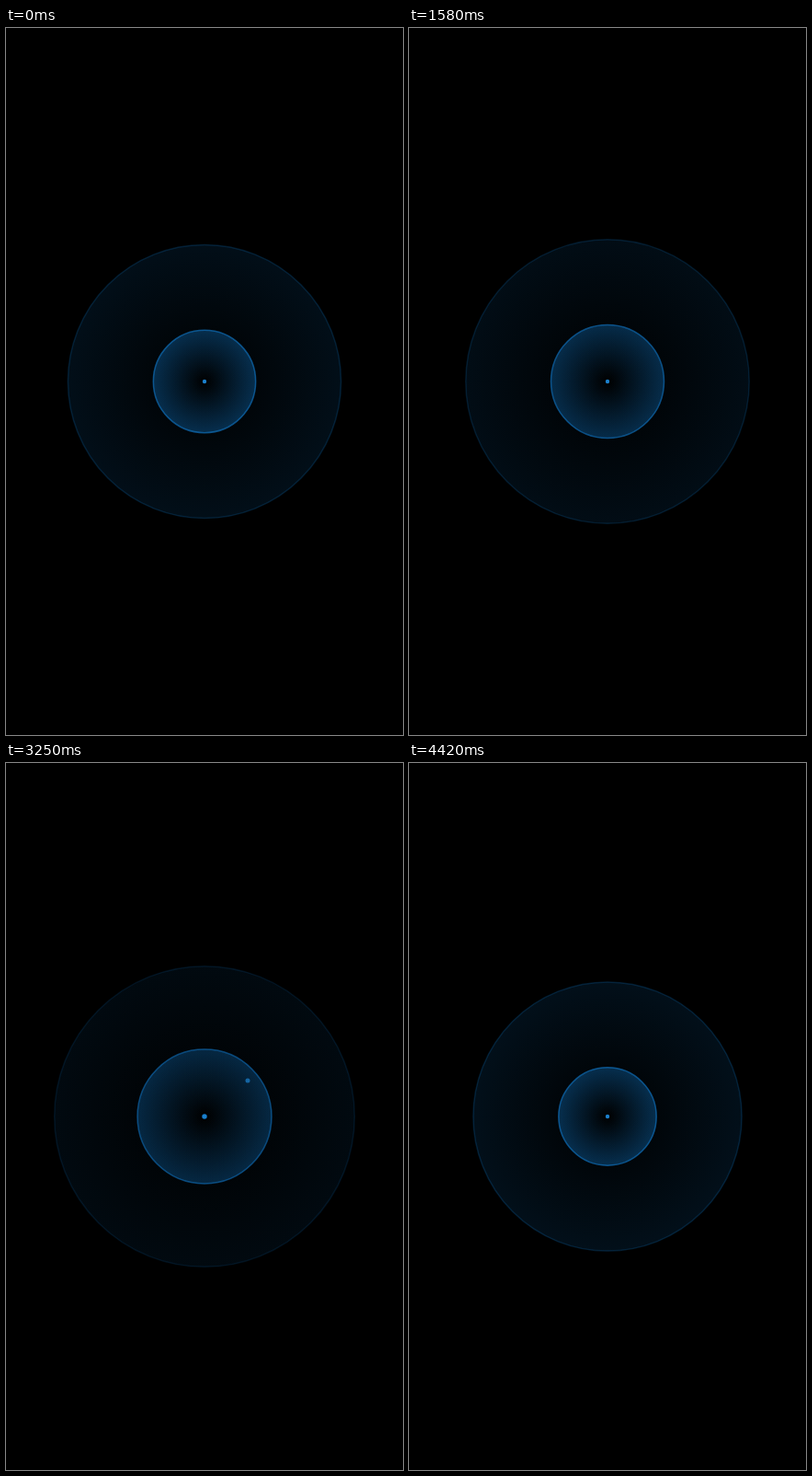
An HTML page with a canvas for the animation above (4460 ms loop, 432 by 768 pixels).

```html
<!DOCTYPE html>
<html lang="en">
<head>
<meta charset="utf-8">
<title>Radar pulse</title>
<style>
  html, body { margin: 0; height: 100%; overflow: hidden; background: #000; }
  canvas { display: block; }
</style>
</head>
<body>
<canvas id="stage" width="432" height="768"></canvas>
<script>
const ctx = document.getElementById('stage').getContext('2d');
const LOOP = 4460, PERIOD = LOOP / 3;
const CX = 216, CY = 384, TAU = Math.PI * 2;

// A ring speeds up, cruises, then brakes to a stop (ms, px per ms)
const CRUISE = 1194, BRAKE = 3000, STOP = 3765, SPEED = 0.0625;

// Blips: [x, y, start in ms]
const BLIPS = [
  [255, 431, 130], [146.5, 424, 1900], [157, 461.5, 2150], [229, 404.5, 2300],
  [248.5, 280, 2380], [263, 345, 3120], [257, 464, 3600]
];
const BLIP_LIFE = 650;

const clamp = v => Math.max(0, Math.min(1, v));
const accent = alpha => `rgba(16, 116, 194, ${clamp(alpha)})`;

function radiusAt(age) {
  const start = Math.min(age, CRUISE), end = Math.max(age - BRAKE, 0);
  return SPEED * (age - start + start ** 2 / (2 * CRUISE) - end ** 2 / (2 * (STOP - BRAKE)));
}

function disc(x, y, r, fill) {
  ctx.beginPath();
  ctx.arc(x, y, r, 0, TAU);
  ctx.fillStyle = fill;
  ctx.fill();
}

function drawRing(age) {
  const r = radiusAt(age), glow = 1 - age / STOP;
  const fill = ctx.createRadialGradient(CX, CY, 0, CX, CY, r);
  fill.addColorStop(0, accent(0));
  fill.addColorStop(1, accent(0.6 * glow));
  disc(CX, CY, r, fill);
  ctx.lineWidth = 1.5;
  ctx.strokeStyle = accent(1.1 * glow);
  ctx.stroke();
}

function draw(time) {
  ctx.fillStyle = '#000';
  ctx.fillRect(0, 0, 432, 768);

  for (let age = time % PERIOD; age < STOP; age += PERIOD) drawRing(age);

  for (const [x, y, start] of BLIPS) {
    const age = time - start;
    ctx.globalAlpha = clamp(Math.min(age / 180, (BLIP_LIFE - age) / 120));
    disc(x, y, 2.5, 'rgb(28, 128, 204)');
  }
  ctx.globalAlpha = 1;
  disc(CX, CY, 2.2, 'rgb(28, 128, 204)');
}

function tick() {
  draw(performance.now() % LOOP);
  requestAnimationFrame(tick);
}
tick();
</script>
</body>
</html>
```
